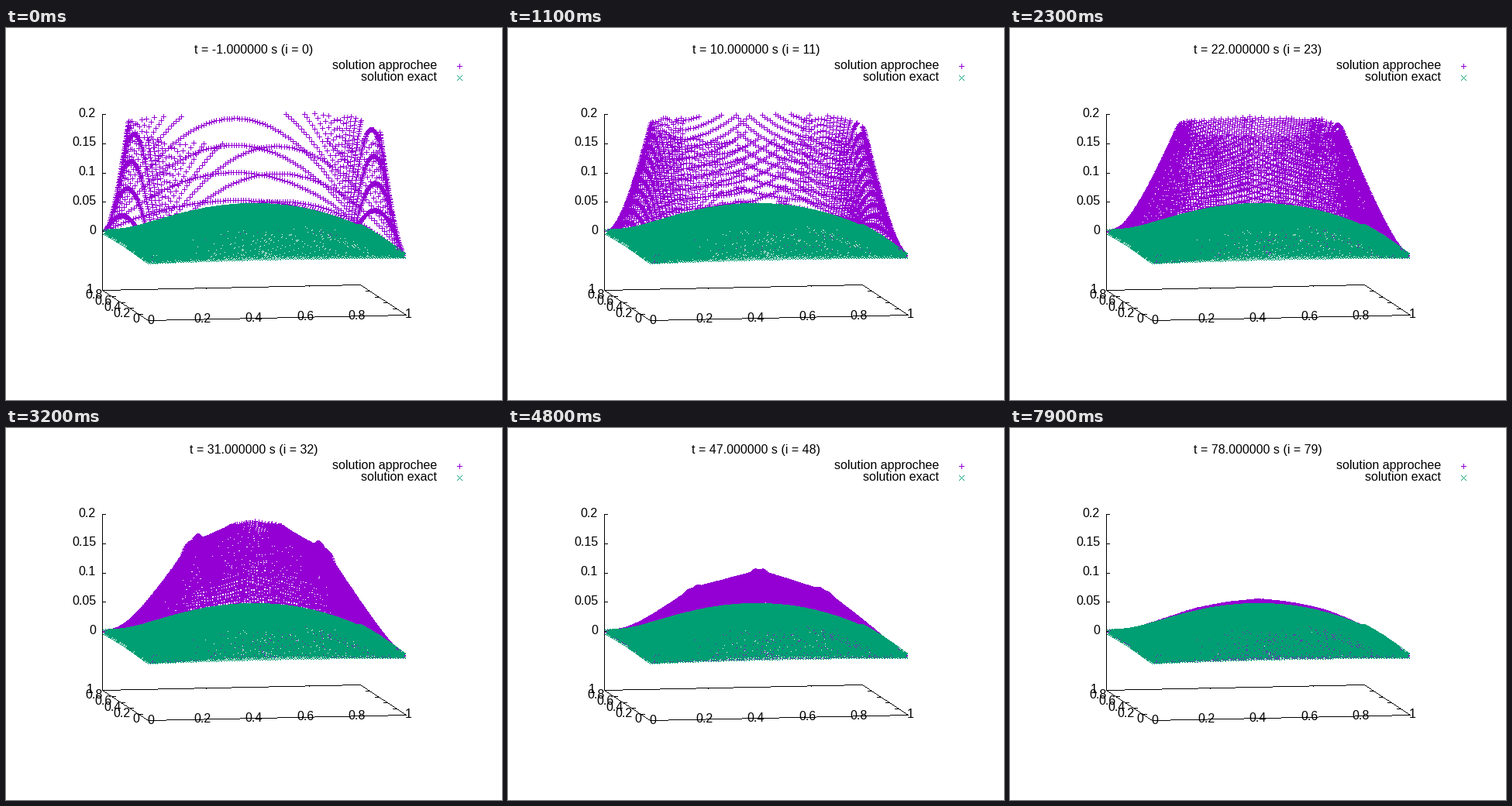
Write a matplotlib script that moves like this. It is 640x480 px and loops after 8000 ms.

```python
import numpy as np
import matplotlib.pyplot as plt
from matplotlib.animation import FuncAnimation

W, H, DPI = 640, 480, 100
FRAMES, STEP_MS = 80, 100
N = 101                                   # grid cells per side
PURPLE, GREEN = (148, 0, 211, 255), (0, 158, 115, 255)
BLACK = (0, 0, 0, 255)
Z_MAX = 0.2

plt.rcParams["font.family"] = "Liberation Sans"


def project(x, y, z=-0.1):
    """Orthographic view; the base plane lies at z = -0.1."""
    sx = 183 + 333 * x - 59 * y
    sy = 377 - 7 * x - 39 * y - 756.7 * (z + 0.1)
    return sx, sy


# Overlapping strips in x. The error is harmonic in each strip, so every
# sine mode in y is a blend of sinh curves between the strip's two ends.
STRIPS = [(0, 29), (26, 54), (51, 79), (76, N)]
modes = np.arange(1, 40, 2)[:, None]
k = modes * np.pi
ys = np.arange(1, N) / N
sines = np.sin(k * ys)


def exact(x, y):
    return x * (1 - x) * y * (1 - y)


def start():
    weight = 19 * 8 / k ** 3
    cols = [np.arange(a, b + 1) / N for a, b in STRIPS]
    return [weight * x * (1 - x) for x in cols]


def relax(parts):
    """One parallel Schwarz step: ends come from the neighbours' last state."""
    out = []
    for p, (a, b) in enumerate(STRIPS):
        left = right = np.zeros_like(k)
        if p > 0:
            j = a - STRIPS[p - 1][0]
            left = parts[p - 1][:, j:j + 1]
        if p < len(STRIPS) - 1:
            j = b - STRIPS[p + 1][0]
            right = parts[p + 1][:, j:j + 1]
        t, size = np.arange(b - a + 1) / N, (b - a) / N
        blend = left * np.sinh(k * (size - t)) + right * np.sinh(k * t)
        out.append(blend / np.sinh(k * size))
    return out


# Only inner points are plotted; the walls stay out.
xs = np.concatenate([np.arange(a, b + 1) for a, b in STRIPS])[1:-1] / N
X, Y = np.meshgrid(xs, ys, indexing="ij")
steady = exact(X, Y)

heights = []
state = start()
for i in range(FRAMES):
    if i > 1:                             # solving begins after t = 0
        state = relax(state)
    error = np.concatenate(state, axis=1)[:, 1:-1]
    heights.append(steady + error.T @ sines)

r = np.arange(-3, 4)
zero = np.zeros_like(r)
DOT = np.zeros(1, int), np.zeros(1, int)
PLUS = np.concatenate([r, zero]), np.concatenate([zero, r])
CROSS = np.concatenate([r, r]), np.concatenate([r, -r])


def stamp(img, sx, sy, shape, color):
    cx = np.rint(np.ravel(sx)).astype(int)[:, None]
    cy = np.rint(np.ravel(sy)).astype(int)[:, None]
    img[cy + shape[1], cx + shape[0]] = color


def line(img, p, q):
    """One-pixel line without smoothing."""
    p, q = np.rint(p), np.rint(q)
    n = int(np.abs(q - p).max()) + 1
    stamp(img, np.linspace(p[0], q[0], n), np.linspace(p[1], q[1], n),
          DOT, BLACK)


def tick(img, p, dx, dy):
    line(img, p, (p[0] + dx, p[1] + dy))


def box():
    img = np.zeros((H, W, 4), np.uint8)
    ring = [(0, 0), (1, 0), (1, 1), (0, 1), (0, 0)]
    for a, b in zip(ring, ring[1:]):
        line(img, project(*a), project(*b))
    line(img, project(0, 1), project(0, 1, Z_MAX))
    for v in np.arange(6) / 5:
        tick(img, project(v, 0), -0.9, -0.6)
        tick(img, project(v, 1), 0.9, 0.6)
        tick(img, project(0, v), 5, -0.1)
        tick(img, project(1, v), -5, 0.1)
    for v in np.arange(5) / 20:
        tick(img, project(0, 1, v), 4, 0)
    return img


BOX = box()


def picture(i):
    img = BOX.copy()
    z = heights[i]
    seen = z <= Z_MAX
    stamp(img, *project(X[seen], Y[seen], z[seen]), PLUS, PURPLE)
    stamp(img, *project(X, Y, steady), CROSS, GREEN)
    stamp(img, 585, 49, PLUS, PURPLE)
    stamp(img, 585, 64, CROSS, GREEN)
    return img


fig = plt.figure(figsize=(W / DPI, H / DPI), dpi=DPI, facecolor="white")
ax = fig.add_axes([0, 0, 1, 1])
ax.axis("off")


def label(x, y, s, ha="center"):
    return ax.text(x, y, s, ha=ha, va="baseline", color="black",
                   fontsize=16 * 72 / DPI, zorder=4)


for v in np.arange(6) / 5:
    sx, sy = project(v, 0)
    label(sx + 3.5, sy + 4.5, f"{v:g}")
    sx, sy = project(0, v)
    label(sx - 11, sy + 3.5, f"{v:g}", "right")

for v in np.arange(5) / 20:
    label(116, project(0, 1, v)[1] + 3.6, f"{v:g}", "right")

label(556, 53, "solution approchee", "right")
label(556, 68, "solution exact", "right")
title = label(320, 33, "")
points = ax.imshow(picture(0), extent=(0, W, H, 0), interpolation="nearest",
                   aspect="auto", zorder=3)
ax.set_xlim(0, W)
ax.set_ylim(H, 0)


def draw(i):
    title.set_text(f"t = {i - 1:.6f} s (i = {i})")
    points.set_data(picture(i))
    return title, points


anim = FuncAnimation(fig, draw, frames=FRAMES, interval=STEP_MS,
                     repeat=True, repeat_delay=0, blit=False)
plt.show()
```
